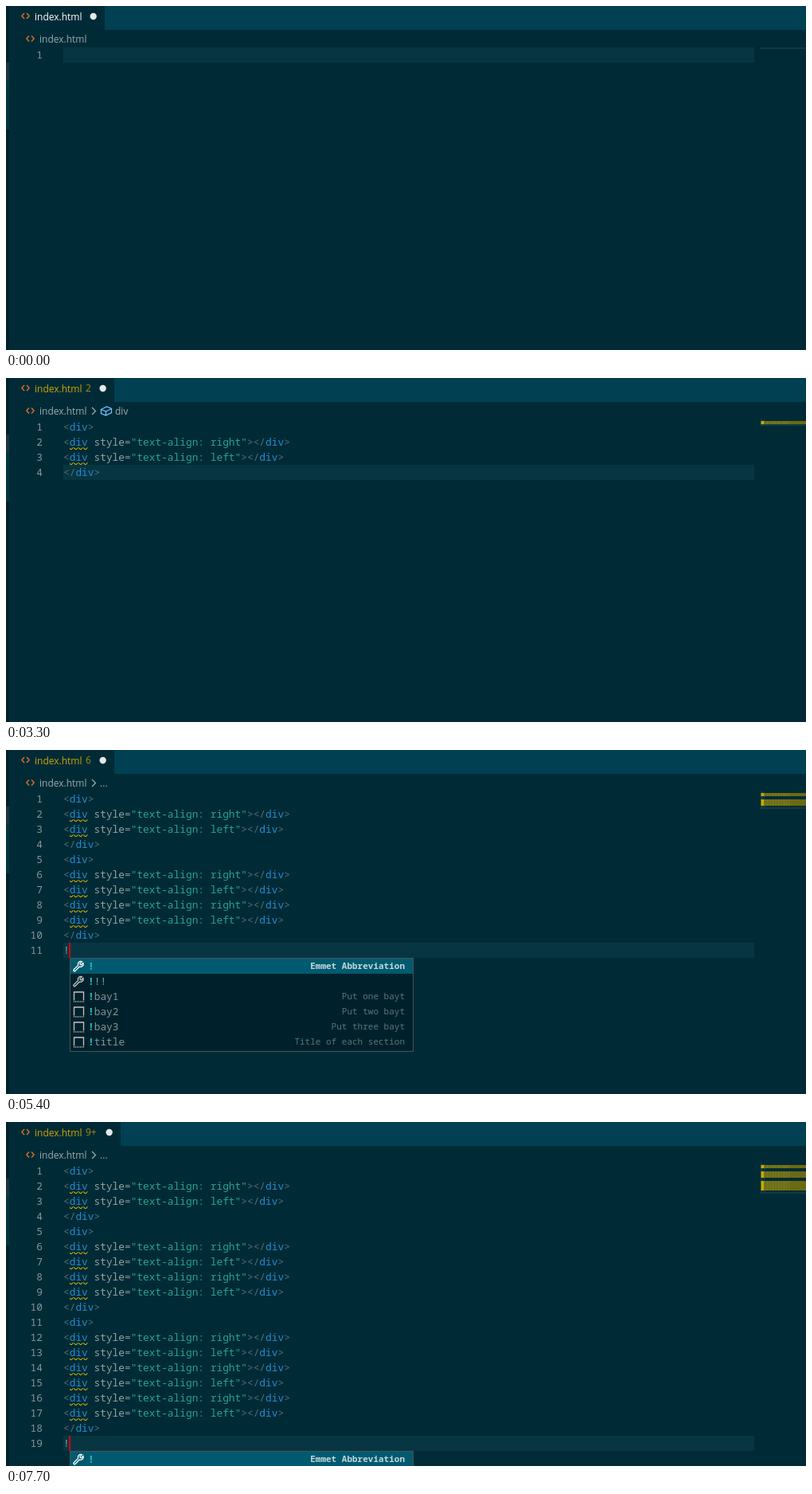
An HTML page that plays this animation: 1005 px wide and 432 px high, repeating every 8000 ms.

```html
<!DOCTYPE html>
<html lang="en">
<head>
<meta charset="utf-8">
<title>Snippet demo</title>
<style>
html, body { margin: 0; width: 100%; height: 100%; overflow: hidden; background: #002b36; }
svg { display: block; }
text { white-space: pre; }
.ui { font: 12px "Open Sans", "Noto Sans", sans-serif; }
.code { font: 12.83px "Noto Sans Mono", "DejaVu Sans Mono", monospace; fill: #839496; }
.num { fill: #84959a; text-anchor: end; }
.tag { fill: #268bd2; }
.attr { fill: #93a1a1; }
.str { fill: #2aa198; }
.punct { fill: #586e75; }
.hit { fill: #23b5bd; font-weight: 700; }
.note { font: 11px "Noto Sans Mono", "DejaVu Sans Mono", monospace; fill: #5a737b; text-anchor: end; }
.picked { fill: #fff; font-weight: 600; }
.note.picked { fill: #c3d6da; }
.line { fill: none; stroke-width: 1.3; }
</style>
</head>
<body>
<svg width="1005" height="432" viewBox="0 0 1005 432">
  <defs>
    <pattern id="wave" width="6" height="3" patternUnits="userSpaceOnUse" x="80">
      <path fill="#d3ae00" d="M5.5 0L2.5 3H1.1L4.1 0ZM4 0L6 2V.6L5.4 0ZM0 2L1 3H2.4L0 .6Z"/>
    </pattern>
    <path id="angles" class="line" stroke="#e0702f" d="M4 -3.5L.8 0L4 3.5M7 -3.5L10.2 0L7 3.5"/>
    <path id="wrench" class="line" d="M2.2 12.3L7.6 6.9A3.7 3.7 0 0 1 12.3 2.2L10 4.5L10.2 6L11.7 6.2L14 3.9A3.7 3.7 0 0 1 9.3 8.6L3.9 14A1.2 1.2 0 0 1 2.2 12.3Z"/>
    <g id="snippet" class="line">
      <path d="M2.5 13V2.5H14.5V13"/>
      <path stroke-dasharray="1 1" d="M2 14.5H15"/>
    </g>
    <path id="cube" class="line" stroke="#75beff" d="M1 4.5L8 1L14 3.5V8.5L7 12L1 9.5ZM1 4.5L7 7L14 3.5M7 7V12"/>
  </defs>
  <rect width="1005" height="432" fill="#002b36"/>
  <rect width="1005" height="30" fill="#004052"/>
  <rect width="4" height="432" fill="#00212b"/>
  <rect y="71" width="4" height="23" fill="#173640"/>
  <rect y="94" width="4" height="61" fill="#003541"/>
  <g id="view"></g>
</svg>
<script>
const LOOP = 8000, TOP = 52, ROW = 19, LEFT = 72, CHAR = 7.7;
const view = document.getElementById('view');

// Each step changes part of the editor state at a time in ms.
// blocks: snippets inserted; marked: lines already checked for warnings
const steps = [
  [0, { blocks: 0, fresh: true, bang: false, caret: false, pick: -1, marked: 0, badge: '', crumb: '' }],
  [1300, { caret: true }],
  [1600, { caret: false }],
  [2000, { caret: true }],
  [2300, { bang: true, pick: 0 }],
  [2600, { pick: 1, caret: false }],
  [2800, { pick: 2, caret: true }],
  [2900, { blocks: 1, fresh: false, bang: false, pick: -1 }],
  [3100, { crumb: 'div' }],
  [3200, { marked: 4, badge: '2' }],
  [3300, { caret: false }],
  [3500, { fresh: true, caret: true }],
  [3700, { bang: true }],
  [3800, { pick: 0 }],
  [3900, { crumb: '...' }],
  [4200, { pick: 1, caret: false }],
  [4300, { pick: 2 }],
  [4400, { caret: true }],
  [4500, { pick: 3 }],
  [4600, { blocks: 2, fresh: false, bang: false, pick: -1 }],
  [4800, { crumb: 'div' }],
  [4900, { marked: 10, badge: '6' }],
  [5000, { caret: false }],
  [5100, { fresh: true, caret: true }],
  [5300, { bang: true }],
  [5400, { pick: 0, crumb: '...' }],
  [5700, { pick: 1, caret: false }],
  [5800, { pick: 2 }],
  [6000, { pick: 3, caret: true }],
  [6100, { pick: 4 }],
  [6400, { blocks: 3, fresh: false, bang: false, pick: -1 }],
  [6600, { crumb: 'div' }],
  [6700, { marked: 18, badge: '9+' }],
  [6800, { caret: false }],
  [7000, { fresh: true, caret: true }],
  [7200, { bang: true }],
  [7300, { crumb: '...' }],
  [7700, { pick: 0 }]
];

const options = [
  ['', 'Emmet Abbreviation'], ['!!', ''], ['bay1', 'Put one bayt'], ['bay2', 'Put two bayt'],
  ['bay3', 'Put three bayt'], ['title', 'Title of each section']
];

const rect = (x, y, w, h, fill, more = '') =>
  `<rect x="${x}" y="${y}" width="${w}" height="${h}" fill="${fill}" ${more}/>`;
const text = (x, y, cls, body, more = '') => `<text x="${x}" y="${y}" class="${cls}" ${more}>${body}</text>`;
const span = (cls, body) => `<tspan class="${cls}">${body}</tspan>`;
const use = (id, x, y, more = '') => `<use href="#${id}" transform="translate(${x} ${y})" ${more}/>`;

const open = span('punct', '&lt;') + span('tag', 'div');
const close = span('punct', '&lt;/') + span('tag', 'div') + span('punct', '&gt;');
const styled = side => open + span('attr', ' style') + '=' +
  span('str', `"text-align: ${side}"`) + span('punct', '&gt;') + close;

function sourceLines(blocks) {
  const lines = [];
  for (let n = 1; n <= blocks; n++) {
    lines.push({ body: open + span('punct', '&gt;'), size: 5 });
    for (let i = 0; i < n; i++) {
      lines.push({ body: styled('right'), size: 37, warn: true }, { body: styled('left'), size: 36, warn: true });
    }
    lines.push({ body: close, size: 6 });
  }
  return lines;
}

function header(s) {
  const width = { '': 120, '9+': 140 }[s.badge] || 132;
  const tint = s.badge ? '#cca700' : '#fff';
  let out = rect(4, 0, width, 30, '#002b36') + use('angles', 19, 12.5) +
    text(36, 18, 'ui', 'index.html', `fill="${tint}"`) +
    text(100, 17, 'ui', s.badge, 'fill="#a68d0b"') +
    `<circle cx="${width - 10.3}" cy="13" r="4.2" fill="#e4e9ea"/>` +
    use('angles', 25, 41) + text(42, 46, 'ui', 'index.html', 'fill="#9aabb0"');
  if (s.crumb) {
    const isTag = s.crumb === 'div';
    out += '<path class="line" stroke="#9aabb0" d="M108 37L112.5 41.5L108 46"/>' +
      (isTag ? use('cube', 118.5, 35) : '') +
      text(isTag ? 137 : 118, 46, 'ui', s.crumb, 'fill="#9aabb0"');
  }
  return out;
}

function minimapLine(line, y, marked) {
  const dashes = color => `<path stroke="${color}" stroke-width="1" stroke-dasharray="3 1 2 1" d="M948 ${y + 1}h${line.size}"/>`;
  if (!line.warn || !marked) return dashes('#1d4d58');
  return rect(948, y, 57, 2, '#6b6912') + dashes('#7f8128') + rect(949, y, 3, 2, '#cca700');
}

function popup(y, pick) {
  let out = rect(80.5, y + .5, 431, 117, '#00212b', 'stroke="#43545a"');
  options.forEach(([name, note], i) => {
    const top = y + 1 + i * ROW, on = i === pick ? ' picked' : '';
    if (on) out += rect(81, top, 430, ROW, '#005a6f');
    out += use(i < 2 ? 'wrench' : 'snippet', 83, top + 1.5, `stroke="${on ? '#fff' : '#c5c5c5'}"`) +
      text(103, top + 14, 'code', span('hit', '!') + span(on, name)) +
      text(501, top + 13, 'note' + on, note);
  });
  return out;
}

function draw(s) {
  const lines = sourceLines(s.blocks);
  if (s.fresh) lines.push({ body: s.bang ? '!' : '', size: s.bang ? 1 : 0 });
  const last = lines.length - 1, lastTop = TOP + last * ROW;
  let out = header(s) + rect(LEFT, lastTop, 868, ROW, '#073642') + rect(948, TOP + last * 2, 57, 2, '#133a41');
  lines.forEach((line, i) => {
    const y = TOP + i * ROW, checked = i < s.marked;
    out += text(46, y + 14, 'code num', i + 1) + text(LEFT, y + 14, 'code', line.body);
    if (line.warn && checked) {
      out += `<g transform="translate(0 ${y + 16})">${rect(80, 0, 23, 3, 'url(#wave)')}</g>`;
    }
    if (line.size) out += minimapLine(line, TOP + i * 2, checked);
  });
  if (s.caret) out += rect(Math.floor(LEFT + lines[last].size * CHAR), lastTop, 2, ROW, '#d30102');
  if (s.pick >= 0) out += popup(lastTop + ROW, s.pick);
  view.innerHTML = out;
}

let shown = -1;
function tick() {
  const t = performance.now() % LOOP;
  const count = steps.filter(([at]) => at <= t).length;
  if (count !== shown) {
    shown = count;
    draw(Object.assign({}, ...steps.slice(0, count).map(step => step[1])));
  }
  requestAnimationFrame(tick);
}
tick();
</script>
</body>
</html>
```
